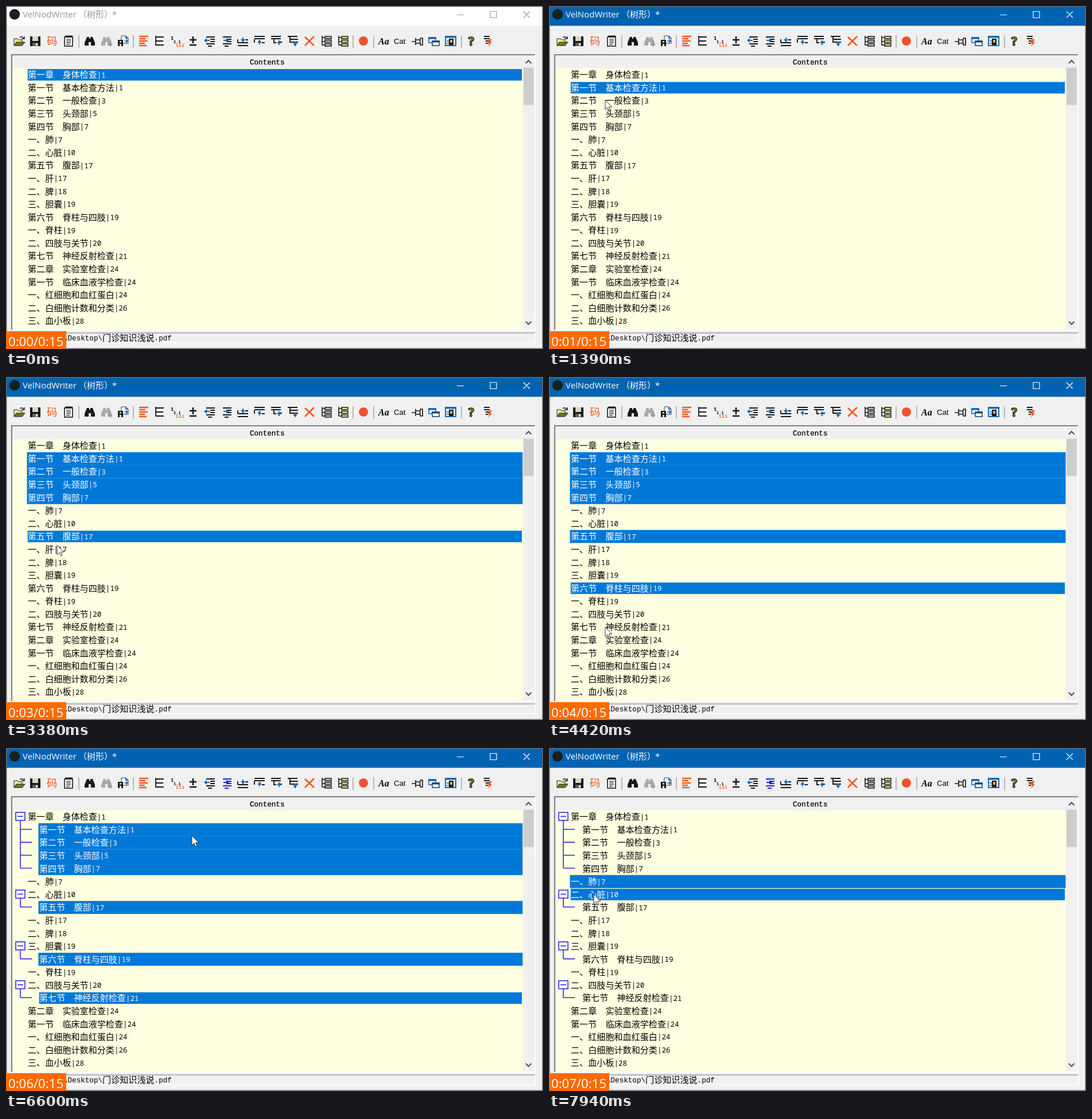
Animation, 936 px wide and 598 px high, one loop 8000 ms. Source, as an HTML page:

```html
<!DOCTYPE html>
<html lang="zh">
<head>
<meta charset="utf-8">
<title>Outline editor</title>
<style>
html, body { margin: 0; width: 100%; height: 100%; overflow: hidden; background: #f0f0f0; }
svg { display: block; width: 100vw; height: 100vh; }
text { white-space: pre; }
.cjk { font: 15.1px "Noto Sans CJK SC", "Noto Sans CJK", sans-serif; }
.mono { font: 12.6px "Noto Sans Mono", monospace; }
.head { font: 12.6px "Liberation Mono", monospace; }
.ui { font: 15px "Open Sans", "Noto Sans CJK SC", "Noto Sans CJK", sans-serif; }
.clock { font: 22.2px "Open Sans", sans-serif; fill: #fff; }
</style>
</head>
<body>
<svg id="stage" viewBox="0 0 936 598" xmlns="http://www.w3.org/2000/svg"></svg>
<script>
const LOOP = 8000, ROW_H = 22.58, ROW_TOP = 108.6;
const rows = ['第一章　身体检查|1', '第一节　基本检查方法|1', '第二节　一般检查|3', '第三节　头颈部|5',
  '第四节　胸部|7', '一、肺|7', '二、心脏|10', '第五节　腹部|17', '一、肝|17', '二、脾|18', '三、胆囊|19',
  '第六节　脊柱与四肢|19', '一、脊柱|19', '二、四肢与关节|20', '第七节　神经反射检查|21', '第二章　实验室检查|24',
  '第一节　临床血液学检查|24', '一、红细胞和血红蛋白|24', '二、白细胞计数和分类|26', '三、血小板|28'];
const tree = [[0, [1, 2, 3, 4]], [6, [7]], [10, [11]], [13, [14]]];
const indented = new Set(tree.flatMap(([, kids]) => kids));

// time, row, added to the selection
const clicks = [[0, 0], [1010, 1], [1550, 2, 1], [2020, 3, 1], [2500, 4, 1], [3060, 7, 1],
  [3860, 11, 1], [4500, 14, 1], [7240, 5], [7940, 6, 1]];
const ticks = [1010, 2100, 3060, 4020, 5120, 6140, 7080];
const ACTIVE_AT = 930, HOT_AT = 5820, INDENT_AT = 6140;

// first change, last change, steps, x, y
const pointerStart = [721, 609];
const moves = [[70, 470, 6, 8, 215], [550, 780, 4, 98, 134], [1240, 1390, 3, 98, 164], [1640, 1800, 3, 85, 190],
  [2180, 2340, 3, 85, 206], [2740, 2900, 3, 91, 274], [3380, 3380, 1, 89, 293], [3460, 3780, 5, 95, 366],
  [4100, 4420, 5, 98, 436], [5120, 5660, 8, 412, 60], [5740, 5900, 3, 385, 57], [6600, 6600, 1, 324, 153],
  [6680, 7160, 7, 77, 236], [7550, 7710, 3, 78, 255]];

const rect = (x, y, w, h, fill, extra = '') => `<rect x="${x}" y="${y}" width="${w}" height="${h}" fill="${fill}" ${extra}/>`;
const line = (d, color = '#181818', w = 2) => `<path d="${d}" fill="none" stroke="${color}" stroke-width="${w}"/>`;
const area = (d, color = '#181818', stroke = 'none') => `<path d="${d}" fill="${color}" stroke="${stroke}"/>`;
const label = (x, y, s, cls, extra = '') => `<text x="${x}" y="${y}" class="${cls}" ${extra}>${s}</text>`;
const icon = (x, body, id = '') => `<g ${id && `id="${id}"`} transform="translate(${x} 61)">${body}</g>`;
const rowY = i => ROW_TOP + i * ROW_H;

const ORANGE = '#f4591c', BLUE = '#1769b5', INK = '#181818';
const binoculars = c => area('M-5-7h4v3h2v-3h4l4 10v5H2V2h-4v6h-7V3z', c);
const outdent = (ink, arrow, flip) =>
  line('M-6-7H9M1-3H9M1 1H9M-6 5H9M-3 9H4', ink, 1.9) +
  `<g transform="scale(${flip} 1) translate(${flip < 0 ? 5 : 0} 0)">` + line('M-8-1H0', arrow) + area('M-10-1l5-4v8z', arrow) + '</g>';
const branch = (d, ax, ay, up) => line(d, INK, 1.9) +
  area(up ? `M${ax} ${ay}l4 5h-8z` : `M${ax} ${ay}l4-5h-8z`, BLUE) + line(`M${ax} ${ay}v${up ? 8 : -8}`, BLUE);
const boxes = c => line('M-7-9V7H-2M-7-6H-2M-7 1H-2', INK, 1.6) +
  [-8, -1.5, 5].map(y => rect(-2, y, 11, 4, c, `stroke="${INK}" stroke-width="1.5"`)).join('');

const toolbar = [
  [23, area('M-9 8V-4h6l2 2h6v4', '#f4ef9a', INK) + area('M-9 8l4-6H10l-5 6z', '#77751a', INK) + line('M1-6q4-3 7 1M9-8v4H4', INK, 1.4)],
  [51, rect(-9, -8, 18, 17, INK) + rect(-5, -8, 10, 8, '#d8d8c4') + rect(-5, 3, 10, 6, '#60605a') + rect(1, 4, 3, 4, '#fff')],
  [80, label(-9, 7, '码', 'cjk', `style="font-size:18.5px" fill="${ORANGE}"`)],
  [109, rect(-7, -7, 14, 16, '#fff', `stroke="${INK}" stroke-width="1.6"`) + line('M-6-8H7', INK, 3) + line('M-4-3H4M-4 0H4M-4 3H4M-4 6H2', '#444', 1.3)],
  [146, binoculars(INK)],
  [175, binoculars('#aaa') + line('M7-2V8M4 5l3 4 3-4', '#999', 1.5)],
  [204, area('M-3-9H5l4 4V4H-3z', '#fff', '#123f73') + line('M5-9v4h4', '#123f73', 1.5) +
    area('M-9-2H0V9H-3V5H-6V9H-9z', INK) + rect(-6, 0, 3, 2.5, '#fff') + line('M2 0h6M5-3l3 3-3 3', BLUE, 1.7)],
  [240, line('M-8-8H8M-8-4H3M-8 0H7M-8 4H2M-8 8H5', ORANGE, 2.3)],
  [268, line('M-7-9V8M-7-7H7M-7 0H6M-7 7H7', INK, 1.8)],
  [297, label(-10, -2, '1', 'mono', 'style="font-size:9px;font-weight:700"') + label(-5, 4, '1.1', 'mono', 'style="font-size:7px;font-weight:700"') +
    label(-1, 10, '1.1.1', 'mono', `style="font-size:7px;font-weight:700;letter-spacing:-1.5px" fill="${ORANGE}"`)],
  [326, line('M0-8V4M-6-2H6M-6 7H6', INK, 2.6)],
  [355, outdent(INK, BLUE, 1)],
  [384, outdent('currentColor', 'var(--arrow)', -1), 'hot'],
  [413, branch('M-9 3H9M-9 8H9M-9-3V3M4-2H9', 0, 2)],
  [442, branch('M-9-8H9M-9-4H9M-9-3V3M4 3H9', 0, -2, 1)],
  [471, branch('M-9-8H8M-9-4H8M-4-4V3H0M3 2H10', 5, -1, 1)],
  [500, branch('M-9-8H8M-5-8V3M-5-3H9M-5 2H9', 4, 9)],
  [529, line('M-8-7L8 8M8-8L-8 8', ORANGE, 2.7)],
  [558, boxes('#b9cfb5')],
  [587, boxes('#eee48a')],
  [623, '<circle r="8" fill="#f0522d"/>'],
  [660, label(-11, 6, 'Aa', '', 'style="font:italic 700 16px \'Liberation Serif\',serif"')],
  [688, label(-12, 5, 'Cat', '', 'style="font:13.2px \'Liberation Sans\',sans-serif"')],
  [717, line('M-10 1H-3M-3-5V7M-3-2H5M-3 4H5M6-6Q3 1 6 8M6-5H9V7H6', INK, 1.7)],
  [746, rect(-9, -6, 12, 9, '#fff', `stroke="${BLUE}" stroke-width="1.6"`) + line('M-10-5H4', BLUE, 3.5) +
    rect(-3, 0, 12, 8, '#fff', 'stroke="#174674" stroke-width="1.6"') + line('M-4 1H10', '#174674', 3)],
  [775, rect(-9, -8, 18, 16, '#e9f3fa', `stroke="${BLUE}" stroke-width="2"`) + line('M-9-7H9', BLUE, 3) +
    area('M-3-4H5V7H-3z', INK) + rect(-1, -2, 4, 5, '#ddb53c') + line('M-7 0h4M-7 4h4', BLUE, 1.5)],
  [812, label(-6, 8, '?', '', 'style="font:700 21px \'Open Sans\',sans-serif" fill="#c6a516" stroke="#181818" stroke-width="1.4"')],
  [839, line('M-6-8H4M-6-4H4M-3 0H4M-3 4H1', INK, 1.8) + area('M4-3L0 4h3L1 10 8 2H5l3-5z', ORANGE)]
].map(([x, body, id]) => icon(x, body, id)).join('') +
  [127, 222, 605, 641, 794].map(x => line(`M${x} 51V73`, '#a0a0a0', 1.4)).join('');

function rowMarkup(text, i) {
  const [name, page] = text.split('|'), y = rowY(i) + 11.3;
  return `<g class="row"><rect fill="#0078d7"/><g>` +
    `<text x="38" y="${y + 5.4}" class="cjk">${name}<tspan class="mono" dy="-.7">|${page}</tspan></text></g></g>`;
}

function treeMarkup([parent, kids]) {
  const mid = i => rowY(i) + 10.6, y = mid(parent);
  return line(`M25 ${y + 7}V${mid(kids.at(-1))}` + kids.map(k => `M25 ${mid(k)}H45`).join(''), '#2a2af0', 1.6) +
    rect(17, y - 7, 16, 14, '#fff', 'stroke="#2a2af0" stroke-width="1.6"') + line(`M20 ${y}H30`, '#2a2af0', 1.6);
}

const stage = document.getElementById('stage');
stage.innerHTML =
  rect(0, 0, 936, 598, '#f0f0f0') +
  rect(1, 1, 934, 33.5, '#fff', 'id="bar"') +
  '<circle cx="15" cy="14.5" r="9.2" fill="#17211b"/>' +
  '<g id="caption">' + label(29, 20, 'VelNodWriter', 'ui') + label(126, 20, '（树形）', 'ui') + label(185, 20, '*', 'ui') + '</g>' +
  '<g id="controls" fill="none" stroke="currentColor" stroke-width="1.2"><path d="M786 15.5H798M844 9.5h11v11h-11zM902 9.5l11 11M913 9.5l-11 11"/></g>' +
  toolbar +
  rect(9, 84, 914, 482, '#fff') + line('M922 85H10V565', '#808080', 2.2) +
  rect(11, 86, 910, 478, '#f0f0f0') +
  rect(11, 108.5, 890, 455, '#ffffe1') +
  label(425, 102, 'Contents', 'head', 'stroke="#000" stroke-width=".25"') +
  rect(902, 107.5, 18, 65, '#cdcdcd') +
  line('M906 100l4.8-5 4.8 5M906 550l4.8 5 4.8-5', '#505050', 2) +
  rows.map(rowMarkup).join('') +
  `<g id="tree">${tree.map(treeMarkup).join('')}</g>` +
  line('M8 570H922', '#a0a0a0', 1.5) + line('M8 587H922.5V570', '#fff', 1.5) +
  `<text x="100" y="583" class="head">\\Desktop\\<tspan class="cjk" dy=".8">门诊知识浅说</tspan><tspan class="head" dy="-.8">.pdf</tspan></text>` +
  rect(.75, .75, 934.5, 596.5, 'none', 'stroke="#6c6c6c" stroke-width="1.5"') +
  rect(0, 567, 105, 31, '#ff6a00') + label(4, 593, '0:00/0:15', 'clock', 'id="clock"') +
  '<path id="pointer" d="M0 0V16.5L3.9 13 6.5 19 9 18 6.5 12H11.8Z" fill="#fff" stroke="#333" stroke-width="1"/>';

const $ = id => document.getElementById(id);
const bar = $('bar'), caption = $('caption'), controls = $('controls'), hot = $('hot');
const treeLines = $('tree'), clock = $('clock'), pointer = $('pointer');
const rowParts = [...stage.querySelectorAll('.row')].map(g => [...g.children]);
const smooth = p => p * p * (3 - 2 * p);

function pointerAt(t) {
  let [x, y] = pointerStart;
  for (const [start, end, steps, tx, ty] of moves) {
    if (t < start) break;
    const step = Math.min(steps, 1 + Math.floor((t - start) / (end - start || 1) * (steps - 1) + 1e-6));
    const p = smooth(step / steps);
    x += (tx - x) * p;
    y += (ty - y) * p;
  }
  return [x, y];
}

function selectionAt(t) {
  let picked = [];
  for (const [at, row, add] of clicks) if (t >= at) picked = add ? [...picked, row] : [row];
  return picked;
}

function draw(t) {
  const active = t >= ACTIVE_AT, nested = t >= INDENT_AT;
  bar.setAttribute('fill', active ? '#0063b1' : '#fff');
  caption.setAttribute('fill', active ? '#fff' : '#959595');
  controls.style.color = active ? '#fff' : '#999';
  hot.style.color = t >= HOT_AT ? '#2020e8' : INK;
  hot.style.setProperty('--arrow', t >= HOT_AT ? '#2020e8' : BLUE);
  treeLines.style.display = nested ? '' : 'none';
  clock.textContent = `0:0${ticks.filter(at => t >= at).length}/0:15`;

  const picked = selectionAt(t), focus = picked.at(-1);
  rowParts.forEach(([back, text], i) => {
    const on = picked.includes(i), shift = nested && indented.has(i) ? 20 : 0, inset = i === focus ? 1.3 : 0;
    back.style.display = on ? '' : 'none';
    back.setAttribute('x', 36.5 + shift + inset);
    back.setAttribute('y', rowY(i) + inset);
    back.setAttribute('width', 864 - shift - 2 * inset);
    back.setAttribute('height', ROW_H + .1 - 2 * inset);
    text.setAttribute('transform', `translate(${shift})`);
    text.setAttribute('fill', on ? '#fff' : '#000');
  });

  pointer.style.display = t < moves[0][0] ? 'none' : '';
  pointer.setAttribute('transform', `translate(${pointerAt(t).join(' ')})`);
}

const began = performance.now();
(function tick() {
  draw((performance.now() - began) % LOOP);
  requestAnimationFrame(tick);
})();
</script>
</body>
</html>
```
